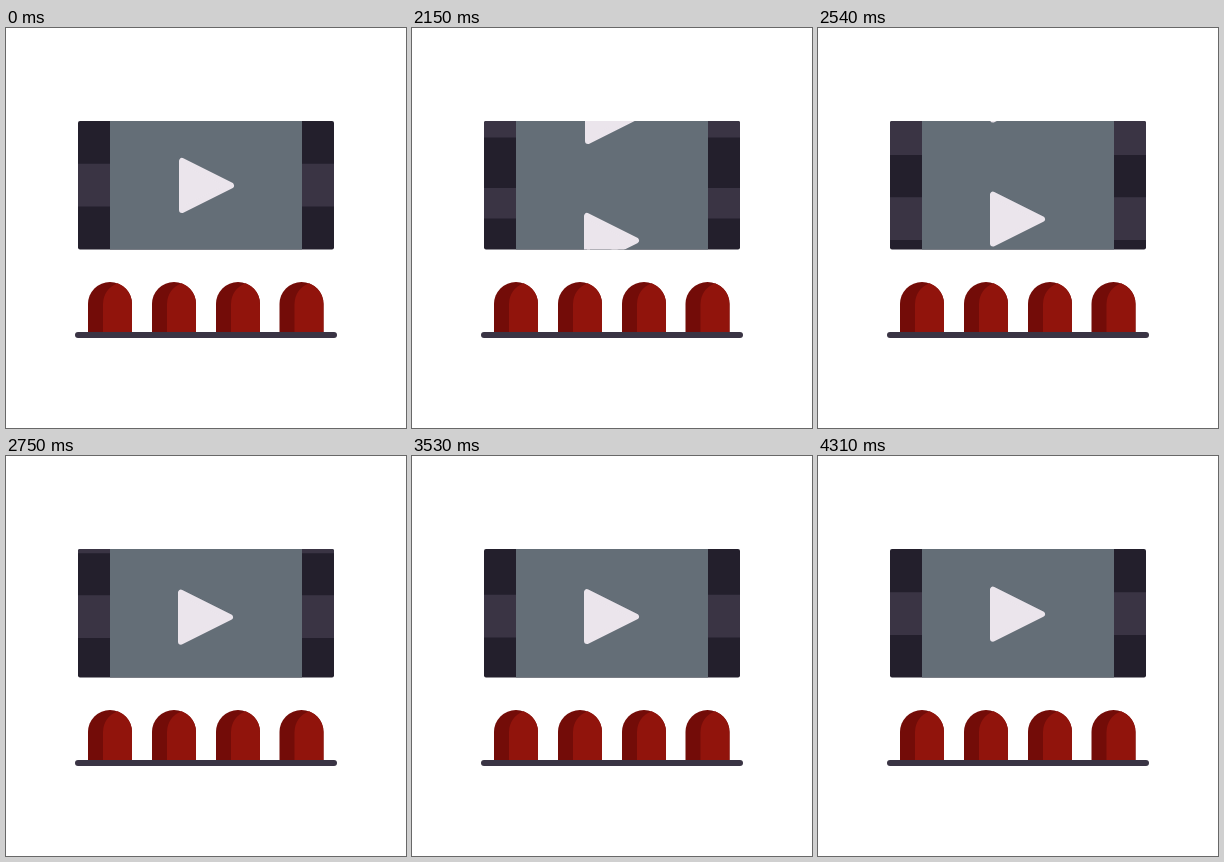
Animation, 400 px wide and 400 px high, one loop 4460 ms. Source, as an HTML page:

```html
<!DOCTYPE html>
<html lang="en">
<head>
<meta charset="utf-8">
<title>Cinema</title>
<style>
  html, body { margin: 0; height: 100%; overflow: hidden; background: #fff; }
  svg { display: block; width: 100%; height: 100%; }
</style>
</head>
<body>
<svg viewBox="0 0 400 400">
  <defs>
    <clipPath id="frame"><rect x="72" y="93" width="256" height="128.5" rx="2"/></clipPath>
    <path id="play" d="M176 133V182L225 157.5Z" fill="#ebe5ec" stroke="#ebe5ec" stroke-width="6" stroke-linejoin="round"/>
    <g id="seat">
      <path d="M82 305V276A22 22 0 0 1 126 276V305Z" fill="#730c08"/>
      <path d="M97 305V276A22 22 0 0 1 111.5 255.3A22 22 0 0 1 126 276V305Z" fill="#91140c"/>
    </g>
    <!-- light film bands, mirrored on both edges -->
    <path id="band" d="M72 0h32v1h-32zM296 0h32v1h-32z" fill="#3a3444"/>
  </defs>
  <g clip-path="url(#frame)">
    <rect x="72" y="93" width="256" height="129" fill="#231f2c"/>
    <rect x="104" y="93" width="192" height="129" fill="#646e77"/>
    <g id="reel">
      <use href="#band" transform="translate(0 135.7) scale(1 42.7)"/>
      <g id="middle">
        <use href="#band" transform="translate(0 229) scale(1 30.6)"/>
        <use href="#band" transform="translate(0 302.3) scale(1 39.2)"/>
      </g>
      <use href="#band" transform="translate(0 383.7) scale(1 42.7)"/>
      <use href="#play"/>
      <use href="#play" x="-1" y="124"/>
      <use href="#play" x="-1" y="248"/>
    </g>
  </g>
  <use href="#seat"/>
  <use href="#seat" x="64"/>
  <use href="#seat" x="128"/>
  <use href="#seat" x="191.5"/>
  <rect x="69" y="304" width="262" height="6" rx="3" fill="#3a3444"/>
</svg>
<script>
const LOOP = 4460, START = 2000, STEP = 30, LAST_STEP = 77;
const reel = document.getElementById('reel');
const middle = document.getElementById('middle');

const mix = (a, b, k) => a + (b - a) * k;
const easeInOut = u => (1 - Math.cos(Math.PI * u)) / 2;

// Cubic Bezier easing, solved by bisection
function bezier(u, x1, y1, x2, y2) {
  const at = (s, a, b) => 3 * s * (1 - s) ** 2 * a + 3 * s * s * (1 - s) * b + s ** 3;
  let lo = 0, hi = 1;
  for (let i = 0; i < 24; i++) {
    const mid = (lo + hi) / 2;
    if (at(mid, x1, x2) < u) lo = mid; else hi = mid;
  }
  return at(lo, y1, y2);
}

// Scroll two film frames up, overshoot, swing back, settle
function offset(step) {
  if (step < 40) return mix(0, -264, bezier(step / 40, .17, .17, .18, 1));
  if (step < 60) return mix(-264, -231, easeInOut((step - 40) / 20));
  return mix(-231, -247.5, easeInOut((step - 60) / 18));
}

function draw(now) {
  const step = Math.floor((now % LOOP - START) / STEP);
  const y = step <= 0 ? 0 : offset(Math.min(step, LAST_STEP));
  reel.setAttribute('transform', `translate(0 ${y.toFixed(2)})`);
  middle.setAttribute('visibility', step > 30 ? 'hidden' : 'visible');
}

const begin = performance.now();
function tick() {
  draw(performance.now() - begin);
  requestAnimationFrame(tick);
}
tick();
</script>
</body>
</html>
```
